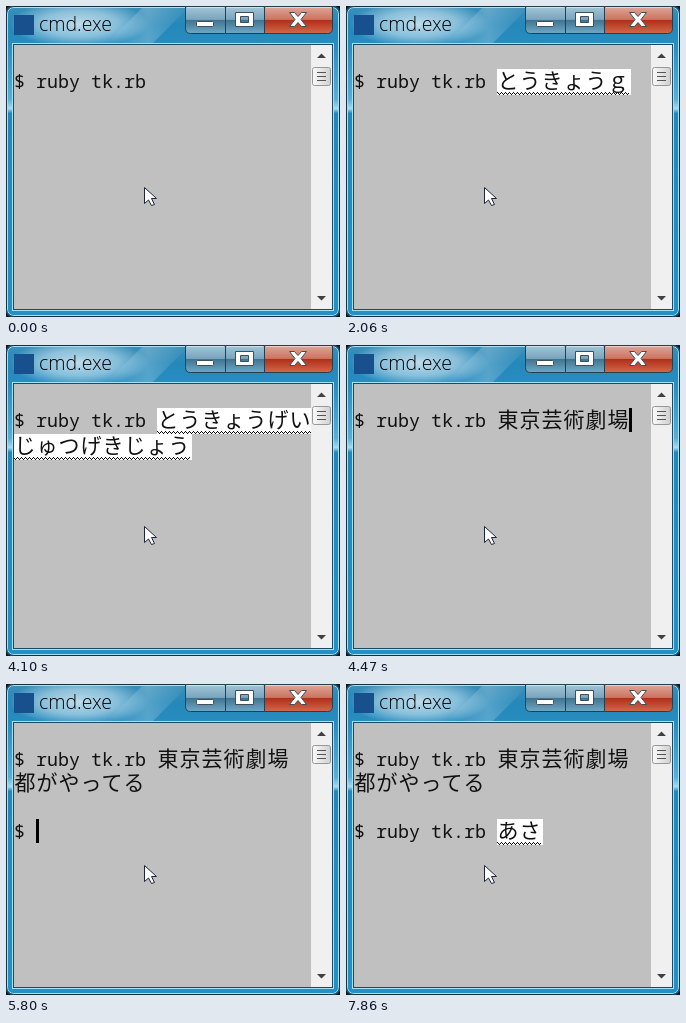
An HTML page for the animation above (8 s loop, 334x311 px).

```html
<!DOCTYPE html>
<html lang="ja">
<head>
<meta charset="utf-8">
<title>cmd.exe</title>
<style>
html, body { margin: 0; width: 100%; height: 100%; overflow: hidden; background: #10181c; }
svg { display: block; width: 334px; height: 311px; }
text { white-space: pre; fill: #111; font-weight: 300 !important; }
.half { font: 18.33px "Noto Sans Mono", "DejaVu Sans Mono", monospace; }
.wide { font: 21px "Noto Sans CJK JP", "Noto Sans CJK", sans-serif; letter-spacing: 1px; }
.title { font: 19.5px "Open Sans", "Noto Sans", sans-serif; fill: #000; }
</style>
</head>
<body>
<svg viewBox="0 0 334 311">
  <defs>
    <linearGradient id="glass" x2="0" y2="1">
      <stop offset="0" stop-color="#3c8fb9"/>
      <stop offset=".06" stop-color="#2488ba"/>
      <stop offset=".13" stop-color="#2a8dbf"/>
      <stop offset=".3" stop-color="#58aed6"/>
      <stop offset=".33" stop-color="#a9d9ee"/>
      <stop offset=".345" stop-color="#2187bb"/>
      <stop offset="1" stop-color="#2390c6"/>
    </linearGradient>
    <radialGradient id="glow">
      <stop offset="0" stop-color="#fff" stop-opacity=".7"/>
      <stop offset=".55" stop-color="#e8f5fb" stop-opacity=".5"/>
      <stop offset="1" stop-color="#fff" stop-opacity="0"/>
    </radialGradient>
    <linearGradient id="streak">
      <stop offset="0" stop-color="#fff" stop-opacity="0"/>
      <stop offset=".5" stop-color="#fff" stop-opacity=".22"/>
      <stop offset="1" stop-color="#fff" stop-opacity="0"/>
    </linearGradient>
    <linearGradient id="blue" x2="0" y2="1">
      <stop offset="0" stop-color="#a4c6d8"/>
      <stop offset=".48" stop-color="#79a5bd"/>
      <stop offset=".5" stop-color="#40728e"/>
      <stop offset="1" stop-color="#6fa9c6"/>
    </linearGradient>
    <linearGradient id="red" x2="0" y2="1">
      <stop offset="0" stop-color="#e0a698"/>
      <stop offset=".48" stop-color="#cc7461"/>
      <stop offset=".5" stop-color="#b02d17"/>
      <stop offset="1" stop-color="#d2694a"/>
    </linearGradient>
    <linearGradient id="thumb">
      <stop offset="0" stop-color="#fafafa"/>
      <stop offset=".5" stop-color="#e6e6e6"/>
      <stop offset="1" stop-color="#cfcfcf"/>
    </linearGradient>
    <pattern id="wave" width="4" height="3" patternUnits="userSpaceOnUse" x="151" y="86">
      <path d="M0 0h1v1h-1zM1 1h1v1h-1zM2 2h1v1h-1zM3 1h1v1h-1z" shape-rendering="crispEdges"/>
    </pattern>
    <clipPath id="frame"><rect width="334" height="311" rx="7"/></clipPath>
  </defs>

  <g clip-path="url(#frame)">
    <rect width="334" height="311" fill="url(#glass)"/>
    <path d="M100 38L138 0H184L146 38Z" fill="url(#streak)"/>
    <ellipse id="halo" cx="73" cy="18" rx="70" ry="23" fill="url(#glow)"/>
  </g>
  <rect x="1.5" y="1.5" width="331" height="308" rx="6" fill="none" stroke="#a4e2f6"/>
  <rect x=".5" y=".5" width="333" height="310" rx="7" fill="none" stroke="#16303e"/>
  <rect x="8" y="9" width="20" height="20" fill="#17508c"/>
  <text id="title" class="title" x="33" y="25"></text>

  <g stroke="#243f4e">
    <path d="M179.500 .5H219.500V27.500H184.500Q179.500 27.500 179.500 22.500Z" fill="url(#blue)"/>
    <path d="M219.500 .5H258.500V27.500H219.500Z" fill="url(#blue)"/>
    <path d="M258.500 .5H326.500V22.500Q326.500 27.500 321.500 27.500H258.500Z" fill="url(#red)"/>
  </g>
  <path d="M181 1.500H218M221 1.500H257M260 1.500H325" stroke="#fff" stroke-opacity=".5"/>
  <g fill="#fff" stroke="#3f4e58">
    <rect x="190.500" y="15.500" width="17" height="5" rx="1"/>
    <path fill-rule="evenodd" d="M229.500 6.500H247.500V20.500H229.500ZM234.500 10.500V16.500H242.500V10.500Z"/>
    <path d="M283.500 6.500H288.500L292 10.500L295.500 6.500H300.500L295 13.500L300.500 20.500H295.500L292 16.500L288.500 20.500H283.500L289 13.500Z"/>
  </g>

  <rect x="6.500" y="37.500" width="321" height="267" fill="none" stroke="#a4e2f6"/>
  <rect x="7" y="38" width="320" height="266" fill="#1d4a62"/>
  <rect x="8" y="39" width="297" height="264" fill="#c0c0c0"/>
  <rect x="305" y="39" width="21" height="264" fill="#f0f0f0"/>
  <path d="M311 52L315.500 47.500L320 52ZM311 290L315.500 294.500L320 290Z" fill="#404040"/>
  <rect x="306.500" y="61.500" width="18" height="18" rx="2" fill="url(#thumb)" stroke="#979797"/>
  <path d="M311 66.500H320M311 70.500H320M311 74.500H320" stroke="#555"/>

  <g id="screen"></g>
  <path d="M138.500 181.500V197.500L142.500 194L145.500 199.500L148.500 198.500L145.500 192.500H150.500Z" fill="#fff" stroke="#1c2440"/>
</svg>

<script>
const LOOP = 8000, LEFT = 8, HALF = 11, WIDE = 22, TOP = 63, ROW = 24, IME_ROW = 26;
const command = '$ ruby tk.rb ', place = '東京芸術劇場';
const inputX = LEFT + command.length * HALF;
const perLine = 7;
const $ = id => document.getElementById(id);

// [start in ms, mode, input text, caret visible]
const steps = [
  [0, 'edit', '', 0],
  [250, 'edit', '', 1],
  [620, 'ime', 'ｔ', 1],
  [740, 'ime', 'と', 1],
  [870, 'ime', 'とう', 1],
  [1110, 'ime', 'とうｋ', 1],
  [1230, 'ime', 'とうｋｙ', 1],
  [1350, 'ime', 'とうきょ', 1],
  [1690, 'ime', 'とうきょ', 0],
  [1930, 'ime', 'とうきょう', 0],
  [2050, 'ime', 'とうきょうｇ', 0],
  [2170, 'ime', 'とうきょうげ', 1],
  [2300, 'ime', 'とうきょうげい', 1],
  [2550, 'ime', 'とうきょうげいｊ', 1],
  [2670, 'ime', 'とうきょうげいじゅ', 1],
  [2920, 'ime', 'とうきょうげいじゅｔ', 0],
  [3030, 'ime', 'とうきょうげいじゅつ', 0],
  [3280, 'ime', 'とうきょうげいじゅつｇ', 1],
  [3400, 'ime', 'とうきょうげいじゅつげ', 1],
  [3650, 'ime', 'とうきょうげいじゅつげｋ', 1],
  [3770, 'ime', 'とうきょうげいじゅつげき', 1],
  [3880, 'ime', 'とうきょうげいじゅつげきｊ', 1],
  [4100, 'ime', 'とうきょうげいじゅつげきじょう', 0],
  [4220, 'convert', place, 0],
  [4470, 'edit', place, 1],
  [4690, 'run', '', 1],
  [5310, 'run', '', 0],
  [5800, 'prompt', '', 1],
  [6300, 'edit', place, 0],
  [6420, 'edit', place, 1],
  ...[6670, 6790, 6910, 7020, 7120, 7360].map((t, i) => [t, 'edit', place.slice(0, 5 - i), 1]),
  [7610, 'ime', 'あ', 1],
  [7860, 'ime', 'あさ', 0]
];

const half = (s, x, y) => `<text class="half" x="${x}" y="${y + 19}">${s}</text>`;
const wide = (s, x, y) => `<text class="wide" x="${x + .5}" y="${y + 19}">${s}</text>`;
const rect = (x, y, w, h, fill) => `<rect x="${x}" y="${y}" width="${w}" height="${h}" fill="${fill}"/>`;
const caret = (x, y) => rect(x, y, 3, ROW, '#000');

function imeLine(s, x, y, isLast, mode, on) {
  const w = s.length * WIDE;
  const line = mode === 'convert' ? rect(x, y + 23, w, 2, '#000')
    : `<g transform="translate(0 ${y - TOP})">${rect(x, TOP + 23, w, 3, 'url(#wave)')}</g>`;
  return rect(x, y, w + (isLast ? 2 : 0), IME_ROW, '#fff') + wide(s, x, y) + line +
    (isLast && on ? rect(x + w, y, 2, IME_ROW, '#000') : '');
}

function composition(s, y, mode, on) {
  const rest = s.slice(perLine);
  return imeLine(s.slice(0, perLine), inputX, y, !rest, mode, on) +
    (rest ? imeLine(rest, LEFT, y + IME_ROW, true, mode, on) : '');
}

function view([time, mode, input, on]) {
  const second = time >= 5800;
  const y = TOP + (second ? 3 * ROW : 0);
  let out = '';
  if (second) out += half(command, LEFT, TOP) + wide(place, inputX, TOP) + wide('都がやってる', LEFT, TOP + ROW);
  if (mode === 'prompt') return out + half('$ ', LEFT, y) + caret(LEFT + 2 * HALF, y);
  out += half(command, LEFT, y);
  if (mode === 'run') return out + wide(place, inputX, y) + (on ? caret(LEFT, y + ROW) : '');
  if (mode === 'edit') return out + wide(input, inputX, y) + (on ? caret(inputX + input.length * WIDE, y) : '');
  return out + composition(input, y, mode, on);
}

let shown;
function draw() {
  const t = performance.now() % LOOP;
  const step = steps.findLast(s => s[0] <= t);
  if (step !== shown) {
    shown = step;
    const running = step[1] === 'run';
    $('screen').innerHTML = view(step);
    $('title').textContent = running ? 'cmd.exe - rub...' : 'cmd.exe';
    $('halo').setAttribute('cx', running ? 105 : 73);
    $('halo').setAttribute('rx', running ? 102 : 70);
  }
  requestAnimationFrame(draw);
}
draw();
</script>
</body>
</html>
```
